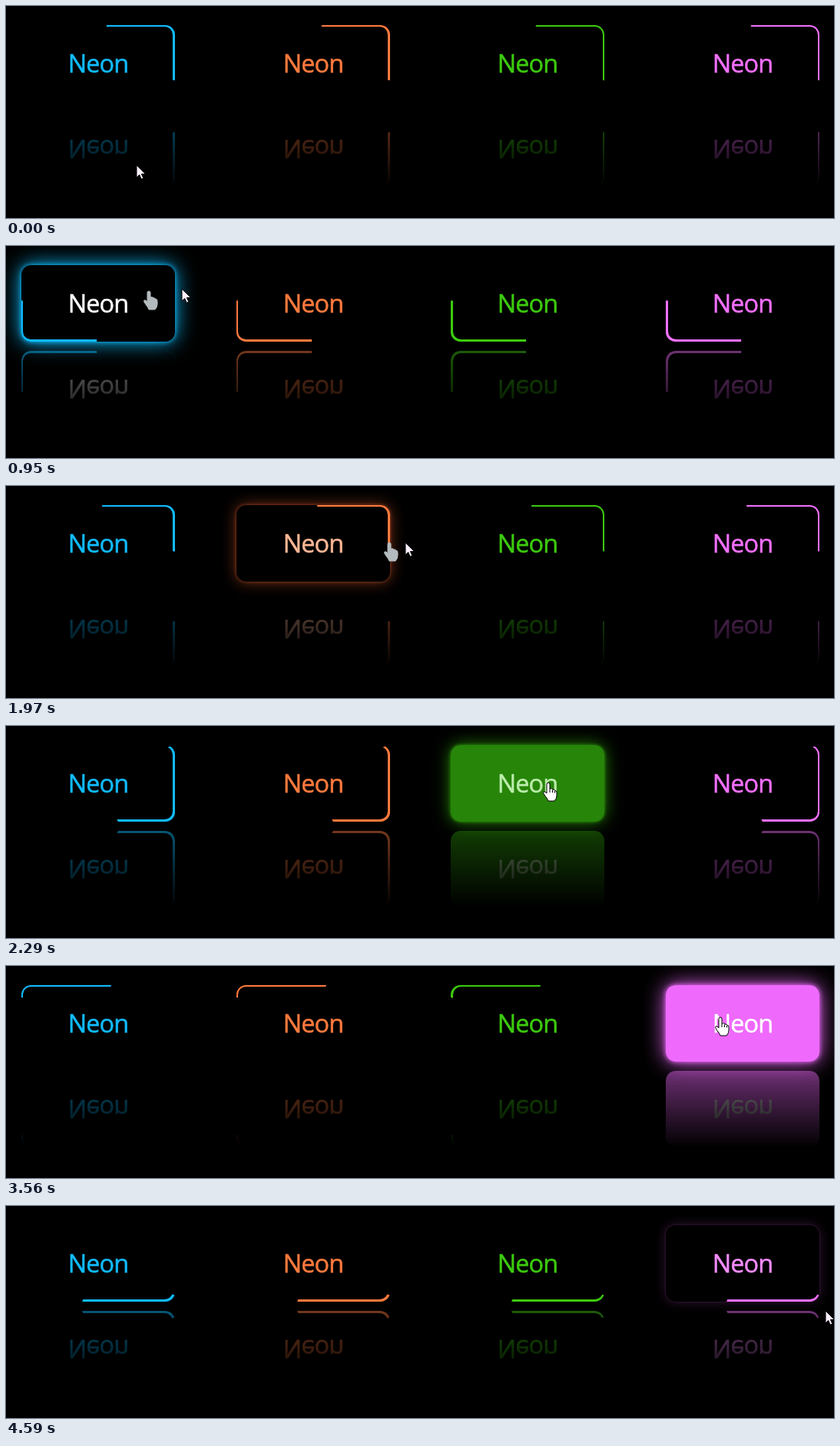
These frames come from a looping animation (1078x277 px, 4.67 s). An HTML page:

```html
<!DOCTYPE html>
<html lang="en">
<head>
<meta charset="utf-8">
<title>Neon buttons</title>
<style>
  html, body { margin: 0; width: 100%; height: 100%; overflow: hidden; background: #000; }
  #stage { position: relative; width: 1078px; height: 277px; overflow: hidden; background: #000; }
  .btn {
    position: absolute; top: 25px; width: 200px; height: 100px;
    border-radius: 12.5px;
    font: 32.5px/100px "Open Sans", "Noto Sans", sans-serif;
    letter-spacing: -1px;
    -webkit-text-stroke: .5px currentColor;
    text-align: center;
  }
  .mirror {
    top: 137px; transform: scaleY(-1);
    -webkit-mask-image: linear-gradient(transparent, rgba(0, 0, 0, .45));
    mask-image: linear-gradient(transparent, rgba(0, 0, 0, .45));
  }
  .ring { position: absolute; inset: 0; border-radius: inherit; overflow: hidden; background: #000; }
  .sweep {
    position: absolute; left: 50%; top: 50%; width: 200px; height: 200px;
    transform-origin: 0 0;
  }
  .core { position: absolute; border-radius: 10.5px; background: #000; }
  .label { position: relative; }
  svg { position: absolute; left: 0; top: 0; overflow: visible; }
</style>
</head>
<body>
<div id="stage"></div>
<script>
const LOOP = 4670, FRAMES = 59, STEP = LOOP / FRAMES, FADE = 250;
const START = -77.5, SPEED = 0.17865; // degrees, degrees per ms

// left edge, line and fill colour, times the pointer enters and leaves
const BUTTONS = [
  { x: 20,  line: [16, 188, 255],  fill: [16, 190, 255],  on: 260,  off: 945 },
  { x: 300, line: [255, 122, 61],  fill: [255, 107, 53],  on: 1155, off: 1900 },
  { x: 579, line: [60, 202, 15],   fill: [60, 203, 14],   on: 2200, off: 3120 },
  { x: 859, line: [243, 112, 255], fill: [241, 107, 255], on: 3350, off: 4465 }
];

// pointer path: time, x, y
const PATH = [
  [0, 170, 208], [450, 172, 75], [870, 186, 59], [950, 229, 56], [1350, 418, 71],
  [1900, 499, 74], [2200, 580, 74], [2290, 706, 74], [3000, 725, 75],
  [3560, 930, 67], [4430, 1040, 85], [4590, 1067, 137]
];

const ARROW = '<path d="M0 0V16L3.7 12.5L6.2 18.2L8.9 17L6.4 11.5H11.5Z" fill="#fdf0fd" stroke="#000"/>';
const OUTLINE = 'M-2 2Q-2 0 0 0T2 2V8Q5 7 6 9Q8.5 8.5 9 10.5Q11 10 11 13V17Q11 21 8 24H0' +
  'Q-1 21 -4 17.5L-6.5 13.5Q-6.5 11 -4 12L-2 14Z';
const HAND = `<path d="${OUTLINE}" fill="#fff" stroke="#000"/>
  <path d="M2 8V13M5.5 9.5V13M8.5 10.8V13.5" fill="none" stroke="#000"/>`;
const GHOST = `<path d="${OUTLINE}" fill="#b4bbbf" stroke="#b4bbbf"/>`;

const stage = document.getElementById('stage');
const rgba = (c, a = 1) => `rgba(${c.map(Math.round).join()},${a})`;
const mix = (a, b, p) => a + (b - a) * p;
const clamp = v => Math.min(1, Math.max(0, v));

// the CSS "ease" curve
function ease(x) {
  if (x <= 0 || x >= 1) return clamp(x);
  const bez = (a, b, u) => 3 * a * u * (1 - u) ** 2 + 3 * b * u * u * (1 - u) + u ** 3;
  let lo = 0, hi = 1;
  for (let i = 0; i < 20; i++) {
    const mid = (lo + hi) / 2;
    if (bez(.25, .25, mid) < x) lo = mid; else hi = mid;
  }
  return bez(.1, 1, lo);
}

function makeButton(b, i, mirrored) {
  const el = document.createElement('div');
  el.className = mirrored ? 'btn mirror' : 'btn';
  el.style.left = b.x + 'px';
  el.innerHTML = `<div class="ring">
    <div class="sweep" style="background:${rgba(b.line)}"></div>
    <div class="core" style="inset:${i < 2 ? '2px 3px 3px 2px' : '2px 2px 3px 3px'}"></div>
  </div><span class="label">Neon</span>`;
  stage.append(el);
  const [ring, sweep, label] = ['.ring', '.sweep', '.label'].map(s => el.querySelector(s));
  return { el, ring, sweep, label };
}

function makePointer(shape) {
  stage.insertAdjacentHTML('beforeend', `<svg width="1" height="1">${shape}</svg>`);
  return stage.lastElementChild;
}

const parts = BUTTONS.map((b, i) => [makeButton(b, i, true), makeButton(b, i, false)]);
const ghost = makePointer(GHOST), arrow = makePointer(ARROW), hand = makePointer(HAND);

const hovers = (b, t) => t >= b.on && t < b.off;
const isOver = t => BUTTONS.some(b => hovers(b, t));

function pointerAt(t) {
  const next = PATH.findIndex(s => s[0] > t);
  const k = next < 1 ? PATH.length - 1 : next;
  const [t0, x0, y0] = PATH[k - 1], [t1, x1, y1] = PATH[k];
  const q = clamp((t - t0) / (t1 - t0));
  return [mix(x0, x1, q), mix(y0, y1, q)];
}

function place(el, t, shown) {
  const [x, y] = pointerAt(t).map(Math.round);
  el.style.transform = `translate(${x}px,${y}px)`;
  el.style.visibility = shown ? 'visible' : 'hidden';
}

function draw(t) {
  BUTTONS.forEach((b, i) => {
    const hover = hovers(b, t);
    const p = t < b.off ? ease((t - b.on) / FADE) : 1 - ease((t - b.off) / FADE);
    const glow = rgba(b.fill, p), spread = mix(.4, 1, p);
    for (const { el, ring, sweep, label } of parts[i]) {
      el.style.background = glow;
      el.style.boxShadow = p > 0
        ? `0 0 ${6 * spread}px ${glow}, 0 0 ${28 * spread}px ${glow}` : 'none';
      ring.style.visibility = hover ? 'hidden' : 'visible';
      sweep.style.transform = `rotate(${START + SPEED * t}deg)`;
      label.style.color = rgba(b.line.map(v => mix(v, 255, p)));
    }
  });

  const over = isOver(t), before = t - STEP;
  place(arrow, t, !over);
  place(hand, t, over);
  place(ghost, before, !over && isOver(before)); // the hand lingers for one step
}

const begin = performance.now();
let last = -1;
function loop() {
  const now = (performance.now() - begin) % LOOP;
  const tick = Math.min(FRAMES - 1, Math.floor((now + 8) / STEP));
  if (tick !== last) draw((last = tick) * STEP);
  requestAnimationFrame(loop);
}
loop();
</script>
</body>
</html>
```
